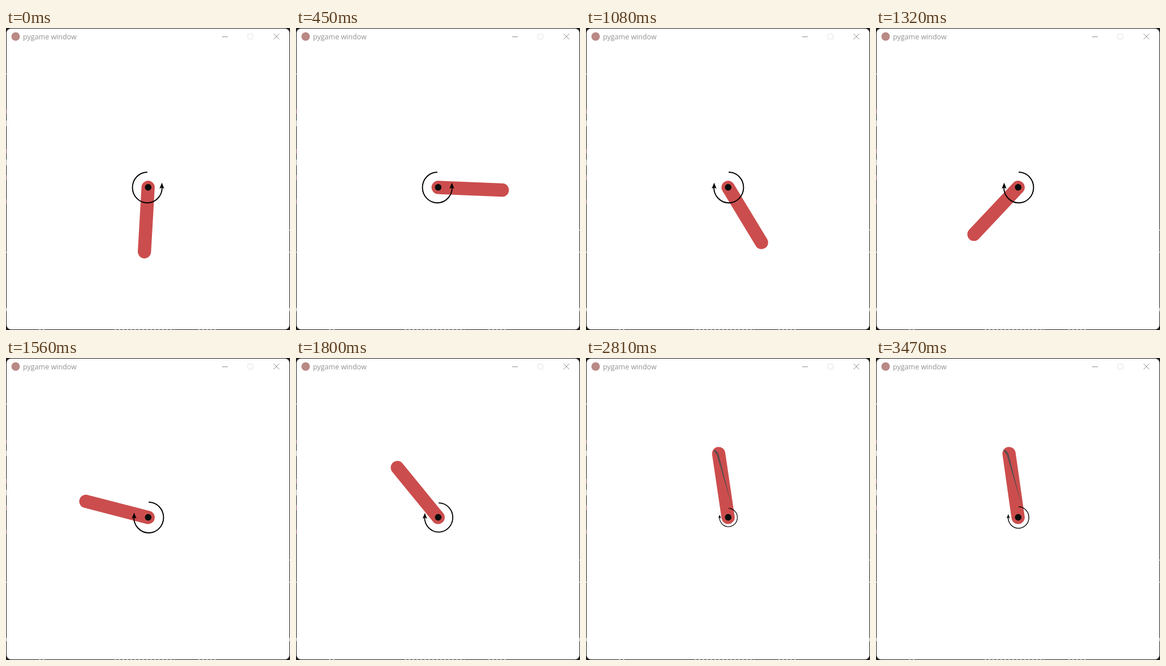
These frames come from a looping animation (502 by 532 pixels, 3860 ms). An HTML page:

```html
<!DOCTYPE html>
<html lang="en">
<head>
<meta charset="utf-8">
<title>Pendulum</title>
<style>
  html, body { margin: 0; width: 100%; height: 100%; overflow: hidden; background: #1e1e1e; }
  svg { display: block; width: 100%; height: 100%; }
  text { font: 12.5px "Open Sans", "Noto Sans", sans-serif; fill: #929292; }
</style>
</head>
<body>
<svg viewBox="0 0 502 532">
  <rect width="502" height="532" fill="#1e1e1e"/>
  <path d="M.5 144v7M.5 213v8M.5 259v9M.5 302v8" stroke="#8a4a5c"/>
  <path d="M.5 80v2M.5 163v10M.5 232v10M.5 394v2M.5 493v6M501.5 355v2M501.5 394v2M501.5 493v6" stroke="#a5a5a5"/>
  <path d="M58 531.5h14M192 531.5h106M340 531.5h34" stroke="#8c8c8c" stroke-dasharray="3 4"/>
  <rect x="1" y="1" width="500" height="530" rx="8" fill="#fff"/>

  <circle cx="17" cy="15" r="7.5" fill="#b98985"/>
  <text x="30" y="20">pygame window</text>
  <g fill="none" stroke="#8f8f8f">
    <path d="M382 15.5h10M473 10l10 10M483 10l-10 10"/>
    <rect x="427.5" y="10.5" width="9" height="9" rx="1" stroke="#e2e2e2"/>
  </g>

  <path id="rod" d="M0 0V-113.6" stroke="#cc4d4d" stroke-width="23.4" stroke-linecap="round"/>
  <polygon id="shade" fill="#5c4d4d"/>
  <g id="arrow">
    <path d="M1.2-27A26.2 27 0 1 1-24.9-1" fill="none" stroke="#000" stroke-width="1.9"/>
    <path d="M-24.5-8.5l4.2 10.5-4.2-2-4.2 2z"/>
  </g>
  <circle cx="251.3" cy="280.6" r="5.8" fill="#0c0c0c"/>
</svg>
<script>
const LOOP = 3860;
const RAD = Math.PI / 180;
const SETTLE = 38;
const byId = id => document.getElementById(id);
const rod = byId("rod"), shade = byId("shade"), arrow = byId("arrow");

// Evenly spaced runs of steps: first time, last time, count
const runs = [
  [0, 0, 1], [30, 510, 9], [570, 930, 7], [980, 1080, 3], [1140, 1620, 9],
  [1680, 1800, 3], [1880, 2150, 6], [2210, 2690, 9], [2750, 3220, 8], [3360, 3470, 2]
];
const times = runs.flatMap(([from, to, n]) =>
  Array.from({ length: n }, (_, i) => from + (to - from) * i / Math.max(1, n - 1)));

// Torque at each step, positive is counterclockwise
function torque(k) {
  if (k < 14) return 1;
  if (k < 31) return -1;
  if (k <= SETTLE) return -0.95 * Math.pow((SETTLE - k) / 7, 1.5);
  return -0.72 * (1 - Math.exp((SETTLE - k) / 5));
}

// Pendulum in degrees from upright, then a damped approach to balance
function simulate(count) {
  const out = [];
  const rest = 8.1;
  const gravity = 15 * 0.05 ** 2 / RAD;
  const push = gravity / 5;
  let angle = 176.7, speed = 13.5;
  for (let k = 0; k < count; k++) {
    if (k > SETTLE) {
      angle = rest + (angle - rest) * 0.74;
    } else if (k > 0) {
      speed += gravity * Math.sin(angle * RAD) + push * torque(k);
      angle += speed;
    }
    out.push({ angle, u: torque(k) });
  }
  return out;
}

const poses = simulate(times.length);

function shadePoints(k) {
  if (k < SETTLE) return "";
  return k < 42
    ? "219,161 228,162 233,166 236,172 258,260 231,171 226,165"
    : "225,163 229,162 234,168 258,262 231,170";
}

function draw(t) {
  let k = times.length - 1;
  while (k > 0 && times[k] > t) k--;
  const { angle, u } = poses[k];
  const size = Math.abs(u);
  rod.setAttribute("transform", `translate(251.2 280.8) rotate(${-angle})`);
  shade.setAttribute("points", shadePoints(k));
  arrow.setAttribute("transform", `translate(251 281) scale(${-u} ${size})`);
  arrow.setAttribute("visibility", size < 0.02 ? "hidden" : "visible");
}

function tick() {
  draw(performance.now() % LOOP);
  requestAnimationFrame(tick);
}
tick();
</script>
</body>
</html>
```
